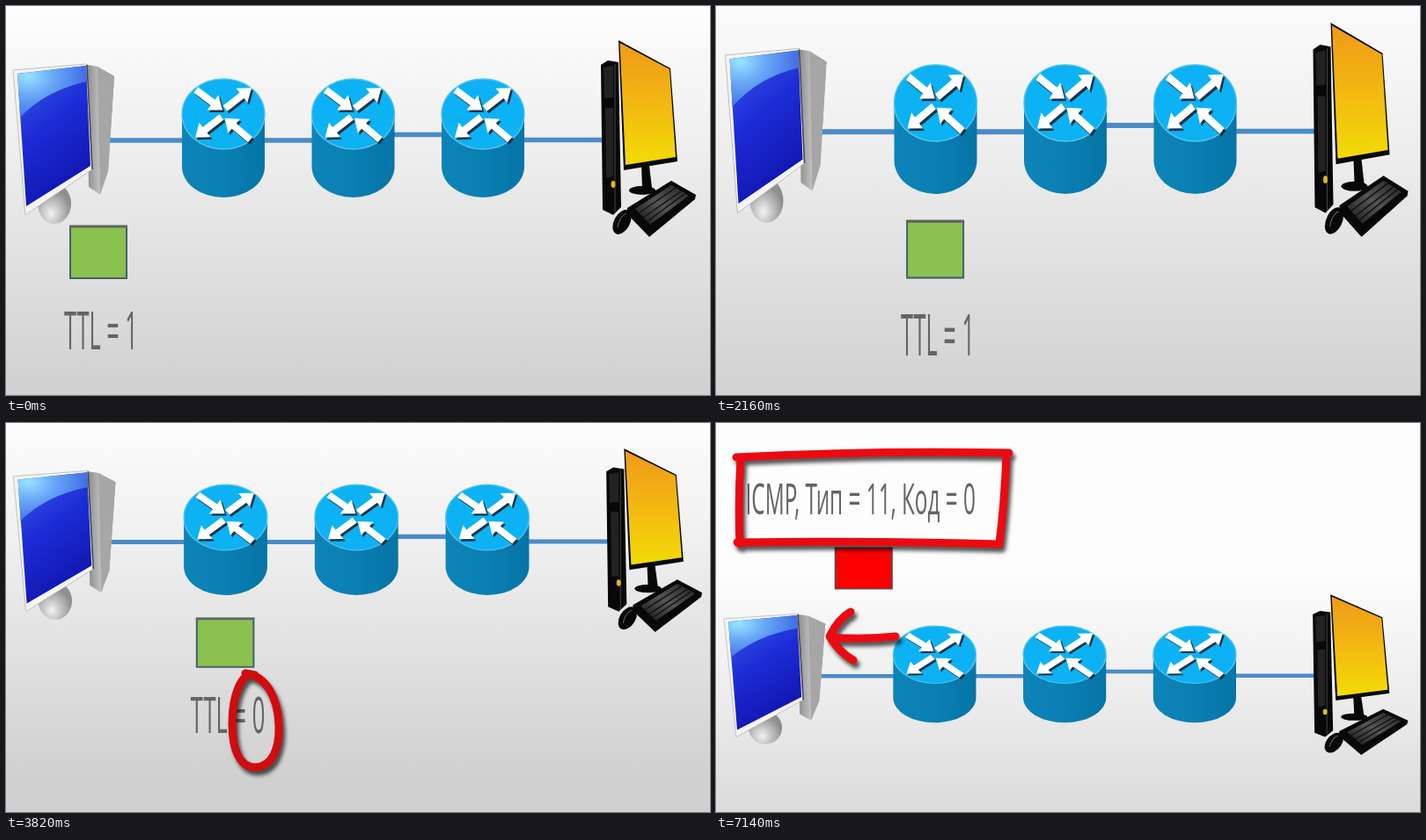
Recreate the animation shown at these times as an HTML page. Size 800x443 px, loop 8 s.

```html
<!DOCTYPE html>
<html lang="ru">
<head>
<meta charset="utf-8">
<style>
  html, body { margin: 0; width: 100%; height: 100%; overflow: hidden; background: #fff; }
  svg { display: block; width: 100vw; height: 100vh; }
  text { font: 60px "Open Sans", "Noto Sans", sans-serif; fill: #646464; }
  .pen { fill: none; stroke: #d00c0e; stroke-linecap: round; stroke-linejoin: round;
         filter: drop-shadow(3px 5px 2px rgba(0, 0, 0, .65)); }
</style>
</head>
<body>
<svg viewBox="0 0 800 443" preserveAspectRatio="none">
  <defs>
    <linearGradient id="wall" gradientUnits="userSpaceOnUse" x1="0" y1="0" x2="0" y2="443">
      <stop stop-color="#fdfdfd"/><stop offset=".35" stop-color="#efefef"/><stop offset="1" stop-color="#d0d0d0"/>
    </linearGradient>
    <linearGradient id="blue" x1="0" y1="0" x2=".4" y2="1">
      <stop stop-color="#3a60e4"/><stop offset=".5" stop-color="#1c2cd6"/><stop offset="1" stop-color="#1216b0"/>
    </linearGradient>
    <radialGradient id="shine" cx=".15" cy=".2" r=".9">
      <stop stop-color="#98e4ff"/><stop offset=".4" stop-color="#6aaaf6"/><stop offset="1" stop-color="#3d66e4"/>
    </radialGradient>
    <linearGradient id="grey">
      <stop stop-color="#8c8c8c"/><stop offset=".5" stop-color="#c4c4c4"/><stop offset="1" stop-color="#8a8a8a"/>
    </linearGradient>
    <radialGradient id="ball" cx=".4" cy=".75" r=".6">
      <stop stop-color="#f2f2f2"/><stop offset="1" stop-color="#8e8e8e"/>
    </radialGradient>
    <linearGradient id="amber" x1="0" y1="0" x2="0" y2="1">
      <stop stop-color="#ee9a18"/><stop offset=".5" stop-color="#f3b812"/><stop offset="1" stop-color="#f1dc06"/>
    </linearGradient>
    <linearGradient id="keys" x1="0" y1="1" x2="1" y2="0">
      <stop stop-color="#161616"/><stop offset=".5" stop-color="#555"/><stop offset="1" stop-color="#202020"/>
    </linearGradient>
    <linearGradient id="side">
      <stop stop-color="#0d84b9"/><stop offset=".5" stop-color="#0a7fb2"/><stop offset="1" stop-color="#0674a6"/>
    </linearGradient>

    <path id="arrow" d="M-19-4H5V-10.5L19 0 5 10.5V4H-19Z"/>
    <g id="arrows">
      <use href="#arrow" transform="translate(-16 -16) rotate(37)"/>
      <use href="#arrow" transform="translate(17 -18) rotate(-38)"/>
      <use href="#arrow" transform="translate(-17 15) rotate(142)"/>
      <use href="#arrow" transform="translate(16 17) rotate(-140)"/>
    </g>
    <g id="router">
      <path d="M-47 0V60A47 35 0 0 0 47 60V0Z" fill="url(#side)"/>
      <ellipse rx="47" ry="40" fill="#0cb2f3" stroke="#5cc4ec" stroke-width="1.3"/>
      <use href="#arrows" x="2" y="2.5" fill="#1c3348"/>
      <use href="#arrows" fill="#fff"/>
    </g>
  </defs>

  <g id="slide">
    <rect x="-20" y="-260" width="860" height="800" fill="url(#wall)"/>
    <path d="M118 153H204M290 153H352M438 146.5H500M584 152.5H680" stroke="#4b8bc8" stroke-width="5.5"/>
    <use href="#router" x="247" y="123"/>
    <use href="#router" x="394.5" y="123"/>
    <use href="#router" x="542" y="123"/>

    <g id="leftComputer">
      <path d="M92 67 105 69 123 80 116 188 107 215 94 206Z" fill="url(#grey)"/>
      <path d="M104 70 123 80 116 188 107 214Z" fill="#a6a6a6"/>
      <ellipse cx="55" cy="225" rx="19" ry="23" fill="url(#ball)"/>
      <path d="M8 73 92 66 98 186 22 238Z" fill="#f4f4f4" stroke="#aaa" stroke-width=".7"/>
      <path d="M13 77 91 68 96 182 23 228Z" fill="url(#blue)"/>
      <path d="M13 77 91 68 92 86Q45 96 16 127Z" fill="url(#shine)"/>
      <path d="M92 67 98 186" stroke="#444" stroke-width="1.5"/>
    </g>

    <g id="rightComputer" fill="#080808">
      <path d="M676 67 684 62 696 64 699 229 690 238 678 232Z"/>
      <path d="M679 70 690 68V104L680 105ZM681 116H690V194L682 196Z" fill="#222"/>
      <path d="M692 66V235" stroke="#444"/>
      <ellipse cx="690" cy="203" rx="2.5" ry="4" fill="#d9b921"/>
      <path d="M722 182H731L734 207H723Z"/>
      <ellipse cx="723" cy="210" rx="15" ry="5"/>
      <path d="M696 39 755 71 763 177 702 187Z"/>
      <path d="M697.5 42 754 72 761 172 704 181Z" fill="url(#amber)"/>
      <path d="M706 230 756 199 784 215 783 220 731 263 706 237Z"/>
      <path d="M715 231 756 204 776 216 732 249Z" fill="url(#keys)"/>
      <path d="M719 236 761 207M724 241 767 211M729 245 771 214" stroke="#111" stroke-width="1.5"/>
      <ellipse cx="700" cy="246" rx="9" ry="15" transform="rotate(28 700 246)"/>
      <path d="M695 252Q697 240 705 236" fill="none" stroke="#666"/>
    </g>

    <g id="packet">
      <rect x="73" y="251" width="64" height="59" fill="#8bc14f" stroke="#45606e" stroke-width="2"/>
      <path d="M72 251H138" stroke="#5e6660" stroke-width="3"/>
      <text id="ttl" transform="translate(66 391) scale(.422 1)"></text>
    </g>
    <g id="reply">
      <rect x="134.5" y="-26" width="64" height="57" fill="#fe0000" stroke="#704040" stroke-width="2"/>
      <text transform="translate(32.5 -73) scale(.405 1)">ICMP, Тип = 11, Код = 0</text>
    </g>
  </g>

  <g class="pen" id="send">
    <path d="M56 415.5H169" stroke-width="13" stroke-linecap="butt"/>
    <path d="M165 284Q200 286 228 281" stroke-width="13" stroke-linecap="butt"/>
    <path d="M210 257Q224 269 227 283Q224 299 216 312" stroke-width="14"/>
  </g>
  <g class="pen" id="circle">
    <path d="M283 287C268 281 257 310 257 342C257 376 268 393 284 392C302 391 311 372 310 344C309 313 296 288 272 285" stroke-width="9"/>
  </g>
  <g class="pen" id="cross">
    <path d="M188 204 313 386M313 204 187 386" stroke-width="8"/>
  </g>
  <g class="pen" id="notice" style="stroke:#ec0a12">
    <path d="M23 39Q180 31 333 34M28 40Q25 90 27 138M24 136Q170 134 322 138M330 36Q328 90 322 137" stroke-width="9"/>
    <path d="M204 243Q165 247 130 244M153 215Q139 223 129 243Q141 262 156 270" stroke-width="9"/>
  </g>
</svg>
<script>
const $ = id => document.getElementById(id);
const MARKS = ['send', 'circle', 'cross', 'notice'];

// start ms, slide scale and shift, TTL (null once dropped), packet at first router, pen mark
const scenes = [
  { at: 0,    sx: 1,      tx: 0,   sy: 1,     ty: 0,     ttl: 1 },
  { at: 500,  sx: 1.01,   tx: 1.5, sy: 1.055, ty: -15.6, ttl: 1, mark: 'send' },
  { at: 2160, sx: 1,      tx: 2.5, sy: 1.09,  ty: -23.6, ttl: 1, hop: true },
  { at: 3820, sx: 1.0085, tx: .4,  sy: .933,  ty: -7.3,  ttl: 0, hop: true, mark: 'circle' },
  { at: 5480, sx: 1.0085, tx: 2.4, sy: .987,  ty: -4.5,  ttl: 0, hop: true, mark: 'cross' },
  { at: 7140, sx: 1.0017, tx: 1,   sy: .816,  ty: 163.4, ttl: null, mark: 'notice' }
];

const show = (id, on) => $(id).setAttribute('display', on ? 'inline' : 'none');
let current;

function draw(now) {
  const time = now % 8000;
  const scene = scenes.findLast(s => time >= s.at);
  if (scene !== current) {
    current = scene;
    const { sx, sy, tx, ty, ttl, hop, mark } = scene;
    $('slide').setAttribute('transform', `matrix(${sx} 0 0 ${sy} ${tx} ${ty})`);
    $('packet').setAttribute('transform', hop ? 'translate(141.6 -4.4)' : '');
    $('ttl').textContent = `TTL = ${ttl}`;
    show('packet', ttl !== null);
    show('reply', ttl === null);
    for (const id of MARKS) show(id, id === mark);
  }
  requestAnimationFrame(() => draw(performance.now() - start));
}

const start = performance.now();
draw(0);
</script>
</body>
</html>
```
